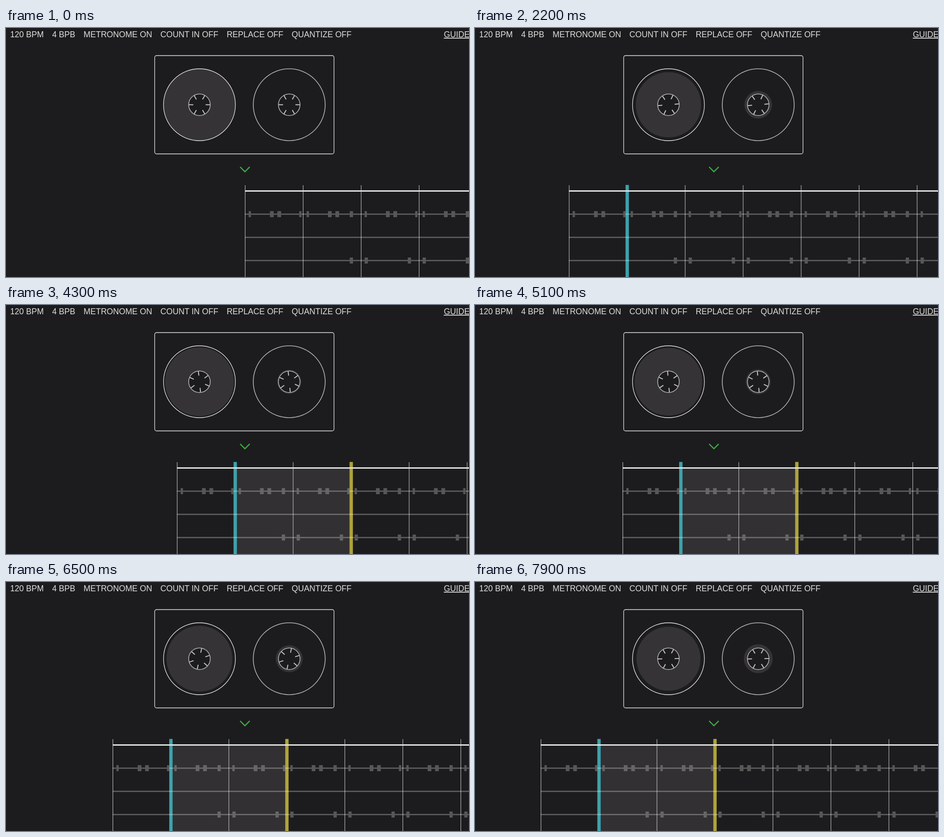
An HTML page that plays this animation: 998 by 537 pixels, repeating every 8000 ms.

```html
<!DOCTYPE html>
<html lang="en">
<head>
<meta charset="utf-8">
<title>Tape looper</title>
<style>
  html, body { margin: 0; width: 100%; height: 100%; overflow: hidden; background: #1c1c1e; }
  svg { display: block; width: 998px; height: 537px; }
  text { font: 17.6px "Liberation Sans", Arial, sans-serif; fill: #dedede; }
  .link { text-decoration: underline 1px; text-underline-offset: 1px; }
  .line { fill: none; stroke: #e4e4e4; stroke-width: 1.3; }
  .soft { stroke: #b4b4b4; stroke-width: 1.6; }
  .tape { fill: #363336; }
  .hub { fill: #1c1c1e; }
  .spoke { stroke: #c6c6c6; stroke-width: 2; }
  .bar { stroke: #dedede; stroke-opacity: .86; stroke-width: 1.1; }
</style>
</head>
<body>
<svg id="stage" viewBox="0 0 998 537" xmlns="http://www.w3.org/2000/svg"></svg>
<script>
const LOOP = 8000, TICK = 100;
const HEAD = 515.5, BAR = 125, LENGTH = 16 * BAR;
const LOOP_IN = BAR, LOOP_OUT = 3 * BAR;
const PLAY_AT = 3546, PLAY_SPEED = .063;   // ms, px per ms
const SEEK_TURN = .975, PLAY_TURN = 1.17;  // reel degrees per px
const stage = document.getElementById('stage');

function add(parent, tag, attrs, content) {
  const el = document.createElementNS('http://www.w3.org/2000/svg', tag);
  for (const key in attrs) el.setAttribute(key, attrs[key]);
  if (content) el.textContent = content;
  return parent.appendChild(el);
}

// Status line
const status = add(stage, 'text', { x: 9, y: 20 });
['120 BPM', '4 BPB', 'METRONOME ON', 'COUNT IN OFF', 'REPLACE OFF', 'QUANTIZE OFF']
  .forEach((label, i) => add(status, 'tspan', { dx: i ? 18 : 0 }, label));
add(stage, 'text', { x: 943.7, y: 20, class: 'link' }, 'GUIDE');

// Cassette
add(stage, 'rect', { x: 320.5, y: 59.5, width: 386.5, height: 212, rx: 4, class: 'line' });

function makeReel(x, rimClass) {
  const g = add(stage, 'g', { transform: `translate(${x} 165.5)` });
  const tape = add(g, 'circle', { class: 'tape' });
  add(g, 'circle', { r: 77.5, class: rimClass });
  add(g, 'circle', { r: 23.3, class: 'hub' });
  const spokes = add(g, 'g', {});
  for (let a = 0; a < 360; a += 60)
    add(spokes, 'line', { x1: 13.3, x2: 23, class: 'spoke', transform: `rotate(${a})` });
  add(g, 'circle', { r: 23.3, class: 'line soft' });
  return { tape, spokes };
}
const supply = makeReel(417, 'line');
const takeup = makeReel(610.5, 'line soft');

add(stage, 'path', {
  d: 'M504.7 299.7L515 310L525.3 299.7', fill: 'none', stroke: '#3fa83f', 'stroke-width': 2.6
});

// Timeline, in pixels from the start of the tape
const timeline = add(stage, 'g', {});
const region = add(timeline, 'rect', {
  x: LOOP_IN, y: 352, width: LOOP_OUT - LOOP_IN, height: 185, fill: '#323032'
});
for (let x = 0; x < LENGTH; x += BAR)
  add(timeline, 'line', { x1: x, x2: x, y1: 339, y2: 537, class: 'bar' });

const marker = (x, fill) =>
  add(timeline, 'rect', { x: x - 3.5, y: 338.5, width: 7.2, height: 199, fill });
const inMark = marker(LOOP_IN, '#3fa1ab');
const outMark = marker(LOOP_OUT, '#aea33b');

const box = (x, y, w, h) => `M${x} ${y}h${w}v${h}h${-w}z`;

// Each pattern character is an eighth note; clips fall just ahead of the offbeat.
function track(y, pattern = '', first = 0, swing = 0) {
  let d = box(-.5, y - 1.5, LENGTH, 3);
  for (let k = first; k < LENGTH / BAR * 8; k++) {
    if (pattern[k % pattern.length] !== 'x') continue;
    const x = Math.floor((k + .5) * BAR / 8 - .8) + .5;
    const w = Math.round(6.5 - swing * Math.cos(k * Math.PI / 4));
    d += box(x, y - 6.5, w, 13);
  }
  add(timeline, 'path', { d, fill: '#fff', 'fill-opacity': .26 });
}
track(401.5, 'x..xx..xx..xx.x.', 0, 1.5);
track(451.5);
track(501.5, 'x.....x.', 14);
add(timeline, 'rect', { x: -.5, y: 350, width: LENGTH, height: 3, fill: '#dfe2e0' });

function ease(t, from, to) {
  const u = Math.min(1, Math.max(0, (t - from) / (to - from)));
  return (1 - Math.cos(Math.PI * u)) / 2;
}

// Seek to each loop point, step back, then play around the loop.
function transport(t) {
  const sought = LOOP_IN * ease(t, 500, 1100)
    + (LOOP_OUT - LOOP_IN) * ease(t, 1600, 2500)
    - 26 * ease(t, 2800, 3000);
  const played = Math.max(0, t - PLAY_AT) * PLAY_SPEED;
  let pos = sought + played;
  if (played) pos = LOOP_IN + (pos - LOOP_IN) % (LOOP_OUT - LOOP_IN);
  return { pos, angle: -SEEK_TURN * sought - PLAY_TURN * played };
}

const show = (el, on) => el.setAttribute('visibility', on ? 'visible' : 'hidden');

function render(t) {
  const { pos, angle } = transport(t);
  timeline.setAttribute('transform', `translate(${HEAD - pos} 0)`);
  supply.tape.setAttribute('r', 77.5 - pos * .0229);
  takeup.tape.setAttribute('r', 22.5 + pos * .0229);
  for (const reel of [supply, takeup]) reel.spokes.setAttribute('transform', `rotate(${angle})`);
  show(inMark, t >= 1300);
  show(outMark, t >= 2900);
  show(region, t >= 2900);
}

const start = performance.now();
function frame() {
  const t = Math.max(0, performance.now() - start) % LOOP;
  render(Math.floor(t / TICK) * TICK);
  requestAnimationFrame(frame);
}
frame();
</script>
</body>
</html>
```
